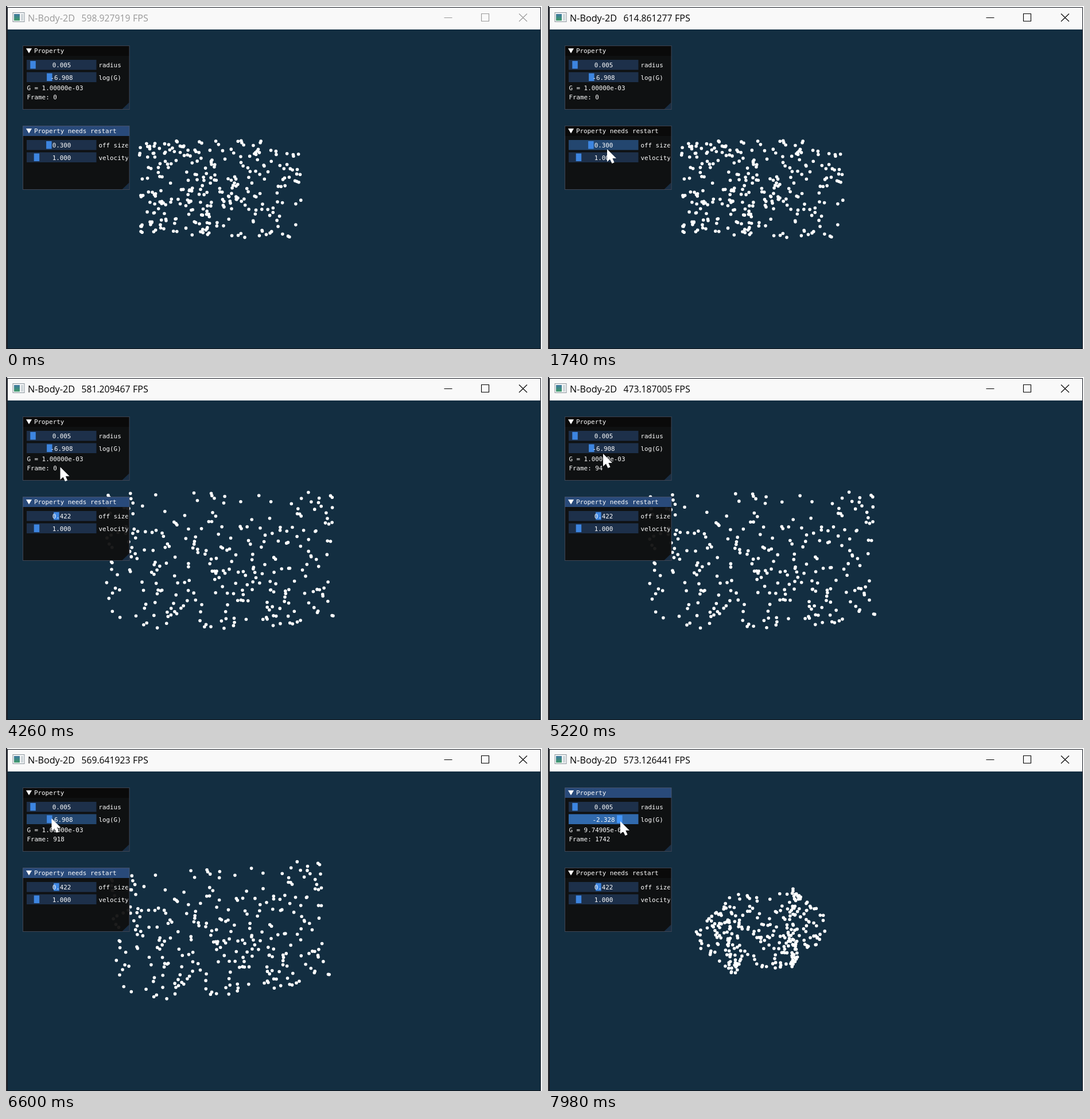
Animation, 934 px wide and 599 px high, one loop 8 s. Source, as an HTML page with a canvas:

```html
<!DOCTYPE html>
<html lang="en">
<head>
<meta charset="utf-8">
<title>N-Body-2D</title>
<style>
  html, body { margin: 0; width: 100%; height: 100%; overflow: hidden; background: #fff; }
  canvas, svg { position: absolute; left: 0; top: 0; width: 934px; height: 599px; }
  text { white-space: pre; }
  #caption text { font: 16.2px "Open Sans", "Noto Sans", sans-serif; fill: currentColor; }
  #caption path { fill: none; stroke: currentColor; stroke-width: 1.1; }
  .panel text { font: 10.85px "DejaVu Sans Mono", monospace; fill: #fff; }
  .body { fill: rgba(15, 15, 15, .94); }
  .bar { fill: #0a0a0a; }
  .focus .bar { fill: #294a7a; }
  .edge { fill: none; stroke: rgba(110, 110, 128, .5); }
  .grip { fill: rgba(66, 150, 250, .22); }
  .frame { fill: rgba(41, 74, 122, .54); }
  .knob { fill: #3d85e0; }
  .hover .frame { fill: rgba(66, 150, 250, .4); }
  .active .frame { fill: rgba(66, 150, 250, .67); }
  .active .knob { fill: #4296fa; }
  .value { text-anchor: middle; }
</style>
</head>
<body>
<canvas width="934" height="599"></canvas>
<svg viewBox="0 0 934 599">
  <defs>
    <linearGradient id="tint" x2="0" y2="1">
      <stop stop-color="#3f78a0"/><stop offset="1" stop-color="#3f9a68"/>
    </linearGradient>
    <clipPath id="inner"><rect x="30" y="60" width="182.5" height="270"/></clipPath>
  </defs>
  <rect width="2" height="599" fill="#2a2c33"/>
  <rect x="3" y="3" width="928" height="38" fill="#f9f9f9"/>
  <rect x="2.5" y="2.5" width="929" height="596" fill="none" stroke="#10141c"/>
  <rect x="12" y="11.5" width="20" height="16" fill="#f4f6f7" stroke="#8b959c"/>
  <rect x="14" y="14" width="10" height="11.5" fill="url(#tint)"/>
  <rect x="26" y="14" width="4" height="11.5" fill="#cfd6da"/>
  <g id="caption">
    <text x="38" y="27">N-Body-2D</text>
    <text id="fps" x="131.5" y="27" style="font-size:15.7px"></text>
    <text x="221" y="27">FPS</text>
    <path d="M763.5 20.5h14M828.5 13.5h13v13h-13zM894 13.5l14 13.5M908 13.5l-14 13.5"/>
  </g>
  <g id="panels"></g>
  <path id="cursor" fill="#fff" d="M0 0V22L5 17.5L8.5 25L12.5 23.3L9.3 16H16Z"/>
</svg>
<script>
const LOOP = 8000, STEP = 60;
const START = 5040, GRAB = 6660;
const CENTER = { x: 373.5, y: 320 };
const $ = id => document.getElementById(id);
const ctx = document.querySelector('canvas').getContext('2d');

const progress = (t, from, to) => Math.min(1, Math.max(0, (t - from) / (to - from)));
const held = (steps, t) => steps.filter(([time]) => time <= t).pop()[1];

const cursorMoves = [
  { from: 60, to: 840, x: 396, y: 158 },
  { from: 1200, to: 1560, x: 103, y: 250 },
  { from: 1740, to: 2040, x: 104, y: 246 },
  { from: 2940, to: 3000, x: 89, y: 246 },
  { from: 3900, to: 4560, x: 96, y: 134 },
  { from: 5220, to: 5820, x: 79.5, y: 123 },
  { from: GRAB, to: 7980, x: 126, y: 128 }
];

function cursorAt(t) {
  let x = 932, y = 200;
  for (const move of cursorMoves) {
    const k = 1 - (1 - progress(t, move.from, move.to)) ** 2;
    x += (move.x - x) * k;
    y += (move.y - y) * k;
  }
  return { x, y };
}

const rates = ['598.927919', '614.861277', '606.418352', '567.786228', '581.209467',
  '473.187005', '569.641923', '580.443239', '573.126441'];
const sizeSteps = [[0, .3], [1800, .562], [3180, .422]];
const focusSteps = [[0, 'restart'], [900, ''], [1800, 'restart'], [GRAB, 'property']];
const pressSteps = [[0, ''], [1800, 'size'], [2040, ''], [3180, 'size'], [3300, ''], [GRAB, 'log']];

const sliders = {
  radius: { y: 94, label: 'radius', min: 0, max: .125 },
  log: { y: 115.5, label: 'log(G)', min: -10, max: 0 },
  size: { y: 234, label: 'off size', min: 0, max: 1 },
  velocity: { y: 255.5, label: 'velocity', min: 0, max: 10 }
};

const sliderMarkup = id => {
  const { y, label } = sliders[id];
  return `<g id="${id}">
    <rect class="frame" x="36" y="${y}" width="121.5" height="17.5"/>
    <rect class="knob" y="${y + 2}" width="9.5" height="13.5"/>
    <text class="value" x="97" y="${y + 13}"></text>
    <text x="161.5" y="${y + 13}" clip-path="url(#inner)">${label}</text></g>`;
};

const panelMarkup = (id, y, title, content) => `<g id="${id}" class="panel">
  <rect class="body" x="29.5" y="${y}" width="185.5" height="111"/>
  <rect class="bar" x="29.5" y="${y}" width="185.5" height="17.5"/>
  <path fill="#fff" d="M35 ${y + 4.5}h10l-5 8.5z"/>
  <text x="49" y="${y + 12.5}">${title}</text>
  <path class="grip" d="M214.5 ${y + 99}v11.5h-12z"/>
  <rect class="edge" x="29.5" y="${y}" width="185.5" height="111"/>${content}</g>`;

$('panels').innerHTML =
  panelMarkup('property', 69.5, 'Property', sliderMarkup('radius') + sliderMarkup('log') +
    '<text id="gravity" x="36.5" y="147"></text><text id="count" x="36.5" y="163"></text>') +
  panelMarkup('restart', 209.5, 'Property needs restart', sliderMarkup('size') + sliderMarkup('velocity'));

function setSlider(id, value, mouse, pressed) {
  const s = sliders[id], g = $(id);
  const over = mouse.x >= 36 && mouse.x <= 157 && mouse.y >= s.y && mouse.y <= s.y + 17.5;
  g.setAttribute('class', pressed === id ? 'active' : over ? 'hover' : '');
  g.querySelector('.knob').setAttribute('x', 38 + 107 * (value - s.min) / (s.max - s.min));
  g.querySelector('.value').textContent = value.toFixed(3);
}

function randomFrom(seed) {
  return () => {
    seed = seed + 0x6D2B79F5 | 0;
    let r = Math.imul(seed ^ seed >>> 15, 1 | seed);
    r = r + Math.imul(r ^ r >>> 7, 61 | r) ^ r;
    return ((r ^ r >>> 14) >>> 0) / 4294967296;
  };
}

// Bodies spread evenly over a box; u and v run from -1 to 1.
function makeCloud(seed, size) {
  const random = randomFrom(seed);
  const bodies = Array.from({ length: 300 }, () => ({ u: random() * 2 - 1, v: random() * 2 - 1 }));
  return { bodies, width: size * 470, height: size * 283 };
}
const cloudSteps = [[0, makeCloud(11, .3)], [2520, makeCloud(23, .562)], [3660, makeCloud(37, .422)]];

// The cloud turns and shrinks, then falls into a rounded shape with two lobes.
function bodyPlacer({ width, height }, t) {
  const drift = Math.max(0, Math.min(t, 6600) - START) / 1380;
  const pull = progress(t, 6600, 7260);
  const s = progress(t, 7260, 7980), fall = .3 * s + .7 * s * s;
  const angle = .07 * drift + .035 * pull + .04 * fall;
  const scale = 1 - .06 * drift - .066 * pull - .28 * fall;
  const cos = Math.cos(angle) * scale, sin = Math.sin(angle) * scale;
  const round = w => 1 + fall * (Math.sqrt(1 - w * w / 2) - 1);

  return ({ u, v }) => {
    const dx = u * round(v) * width, dy = v * round(u) * height;
    const x = dx * cos + dy * sin, y = dy * cos - dx * sin;
    const wave = (x + 57) * Math.PI / 55;
    return {
      x: CENTER.x + x - 12 * fall * Math.sin(wave),
      y: CENTER.y + y * (1 + .1 * fall * Math.cos(wave))
    };
  };
}

function drawBodies(t) {
  const cloud = held(cloudSteps, t), place = bodyPlacer(cloud, t);
  ctx.fillStyle = '#132e41';
  ctx.fillRect(2, 2, 930, 597);
  ctx.fillStyle = '#fff';
  ctx.beginPath();
  for (const body of cloud.bodies) {
    const { x, y } = place(body);
    ctx.moveTo(x + 2.8, y);
    ctx.arc(x, y, 2.8, 0, 7);
  }
  ctx.fill();
}

function gravityText(log) {
  const [mantissa, exponent] = Math.exp(log).toExponential(5).split('e-');
  return `G = ${mantissa}e-${exponent.padStart(2, '0')}`;
}

function render(now) {
  const t = Math.floor(now % LOOP / STEP) * STEP;
  const mouse = cursorAt(t);
  const pressed = held(pressSteps, t), focus = held(focusSteps, t);
  const dragged = Number(((mouse.x - 43.91) / 10.7 - 10).toFixed(3));
  const log = t < GRAB ? Math.log(.001) : dragged;

  drawBodies(t);
  const grey = 153 * (1 - progress(t, 840, 1020));
  $('caption').style.color = `rgb(${grey}, ${grey}, ${grey})`;
  $('fps').textContent = rates[Math.floor((t + STEP) / 1000)];
  for (const id of ['property', 'restart']) $(id).classList.toggle('focus', id === focus);
  setSlider('radius', .005, mouse, pressed);
  setSlider('log', log, mouse, pressed);
  setSlider('size', held(sizeSteps, t), mouse, pressed);
  setSlider('velocity', 1, mouse, pressed);
  $('gravity').textContent = gravityText(log);
  $('count').textContent = 'Frame: ' + Math.max(0, Math.round(.597 * (t - START) - 13));
  $('cursor').setAttribute('transform', `translate(${mouse.x} ${mouse.y})`);
  $('cursor').style.display = t < STEP ? 'none' : '';
}

const start = performance.now();
function tick() {
  render(performance.now() - start);
  requestAnimationFrame(tick);
}
tick();
</script>
</body>
</html>
```
